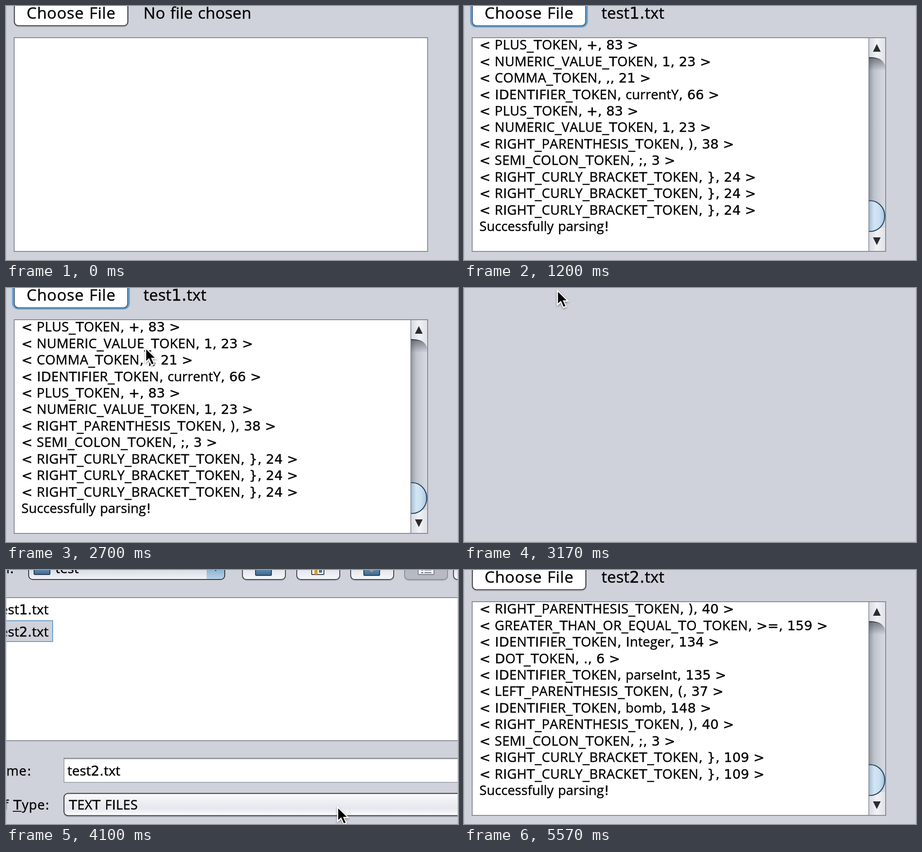
Animation, 998 px wide and 561 px high, one loop 5.6 s. Source, as an HTML page with a canvas:

```html
<!DOCTYPE html>
<html lang="en">
<head>
<meta charset="utf-8">
<title>Token parser</title>
<style>
html, body { margin: 0; width: 100%; height: 100%; overflow: hidden; background: #cfd2da; }
canvas { display: block; }
</style>
</head>
<body>
<canvas id="stage" width="998" height="561"></canvas>
<script>
const W = 998, H = 561, LOOP = 5600;
const ctx = document.getElementById('stage').getContext('2d');
const BG = '#cfd2da', LINE = '#858a96', DARK = '#34373e', BLUE = '#6a9ecd';

const RESULTS = {
  first: [
    '< PLUS_TOKEN, +, 83 >',
    '< NUMERIC_VALUE_TOKEN, 1, 23 >',
    '< COMMA_TOKEN, ,, 21 >',
    '< IDENTIFIER_TOKEN, currentY, 66 >',
    '< PLUS_TOKEN, +, 83 >',
    '< NUMERIC_VALUE_TOKEN, 1, 23 >',
    '< RIGHT_PARENTHESIS_TOKEN, ), 38 >',
    '< SEMI_COLON_TOKEN, ;, 3 >',
    '< RIGHT_CURLY_BRACKET_TOKEN, }, 24 >',
    '< RIGHT_CURLY_BRACKET_TOKEN, }, 24 >',
    '< RIGHT_CURLY_BRACKET_TOKEN, }, 24 >',
    'Successfully parsing!'
  ],
  second: [
    '< RIGHT_PARENTHESIS_TOKEN, ), 40 >',
    '< GREATER_THAN_OR_EQUAL_TO_TOKEN, >=, 159 >',
    '< IDENTIFIER_TOKEN, Integer, 134 >',
    '< DOT_TOKEN, ., 6 >',
    '< IDENTIFIER_TOKEN, parseInt, 135 >',
    '< LEFT_PARENTHESIS_TOKEN, (, 37 >',
    '< IDENTIFIER_TOKEN, bomb, 148 >',
    '< RIGHT_PARENTHESIS_TOKEN, ), 40 >',
    '< SEMI_COLON_TOKEN, ;, 3 >',
    '< RIGHT_CURLY_BRACKET_TOKEN, }, 109 >',
    '< RIGHT_CURLY_BRACKET_TOKEN, }, 109 >',
    'Successfully parsing!'
  ]
};

// Pointer paths as [time, x, y]
const PATHS = [
  [[2470, 705, 500], [2700, 307, 130], [2840, 222, 14], [3000, 207, 3], [3170, 205, 3],
   [3270, 200, 28], [3540, 171, 139], [3680, 85, 136], [3760, 85, 136],
   [3900, 330, 270], [4100, 731, 521], [4200, 860, 566]],
  [[4740, 560, 545], [4880, 300, 528], [5010, 134, 540], [5040, 130, 551], [5090, 130, 563]]
];

const within = (t, ...spans) => spans.some(([a, b]) => t >= a && t < b);

function box(x, y, w, h, fill) {
  ctx.fillStyle = fill;
  ctx.fillRect(x, y, w, h);
}

function rounded(x, y, w, h, r, fill, stroke, width = 2) {
  ctx.beginPath();
  ctx.roundRect(x, y, w, h, r);
  if (fill) { ctx.fillStyle = fill; ctx.fill(); }
  if (stroke) { ctx.strokeStyle = stroke; ctx.lineWidth = width; ctx.stroke(); }
}

function poly(points, fill) {
  ctx.beginPath();
  points.forEach(([x, y]) => ctx.lineTo(x, y));
  ctx.closePath();
  ctx.fillStyle = fill;
  ctx.fill();
}

function gradient(x0, y0, x1, y1, ...colors) {
  const g = ctx.createLinearGradient(x0, y0, x1, y1);
  colors.forEach((c, i) => g.addColorStop(i / (colors.length - 1), c));
  return g;
}

// Symbols and the wide capitals D, I, T use a second face; a hairline stroke adds weight.
function text(str, x, y, { size = 29.2, track, right = false } = {}) {
  ctx.fontKerning = 'none';
  const runs = str.match(/[A-CE-HJ-SU-Z]+|[a-z]+|[^A-CE-HJ-SU-Za-z]+/g).map(s => {
    const face = /[A-CE-HJ-SU-Za-z]/.test(s) ? 'Open Sans' : 'DejaVu Sans';
    const font = `${size}px "${face}", sans-serif`;
    const spacing = `${track ?? (/[A-Z]/.test(s) ? 0.3 : 0.05)}px`;
    ctx.font = font;
    ctx.letterSpacing = spacing;
    return { s, font, spacing, width: ctx.measureText(s).width };
  });
  if (right) x -= runs.reduce((sum, r) => sum + r.width, 0);
  ctx.fillStyle = ctx.strokeStyle = '#050505';
  ctx.lineWidth = 0.5;
  for (const r of runs) {
    ctx.font = r.font;
    ctx.letterSpacing = r.spacing;
    ctx.fillText(r.s, x, y);
    ctx.strokeText(r.s, x, y);
    x += r.width;
  }
}

function chooseButton(focused, pressed) {
  const fill = pressed ? gradient(0, 0, 0, 44, '#b9bdc7', '#d3d7df') : '#fff';
  if (focused) {
    rounded(16, -30, 255, 75, 11, null, BLUE, 5);
    rounded(18.5, -30, 250, 73.5, 9, fill, '#33506f', 1.7);
  } else {
    rounded(18, -30, 252, 76, 10, null, '#b4b8c1', 2);
    rounded(18.5, -30, 250.5, 73.5, 9, fill, DARK, 2);
  }
  text('Choose File', 45.6, 28, { size: 35, track: 0.7 });
}

function scrollbar() {
  box(893, 71, 37, 470, gradient(893, 0, 930, 0, '#8e929b', '#bfc3cc', '#cdd0d8', '#d6d9e0'));
  box(893, 113, 37, 30, gradient(0, 113, 0, 143, 'rgba(60,64,72,.6)', 'rgba(60,64,72,0)'));

  ctx.beginPath();
  ctx.moveTo(893, 71);
  ctx.lineTo(893, 113);
  ctx.bezierCurveTo(914, 113, 924, 117, 929, 132);
  ctx.lineTo(930, 132);
  ctx.lineTo(930, 71);
  ctx.closePath();
  ctx.fillStyle = gradient(893, 0, 930, 0, '#d5d8df', '#f1f2f5', '#dfe2e8');
  ctx.fill();
  ctx.beginPath();
  ctx.moveTo(893, 114);
  ctx.bezierCurveTo(914, 114, 924, 118, 929, 132);
  ctx.strokeStyle = gradient(893, 0, 930, 0, '#24262b', '#555a63', '#b8bcc5');
  ctx.lineWidth = 2;
  ctx.stroke();

  box(893, 490, 37, 51, gradient(893, 0, 930, 0, '#d5d8df', '#f1f2f5', '#dfe2e8'));
  ctx.save();
  ctx.beginPath();
  ctx.rect(894, 425, 38, 80);
  ctx.clip();
  ctx.beginPath();
  ctx.ellipse(897, 464, 32, 34, 0, 0, 7);
  ctx.fillStyle = gradient(894, 0, 929, 0, '#a0bdd6', '#d3e5f3', '#c9dff1', '#a4c3de');
  ctx.fill();
  ctx.strokeStyle = '#24445f';
  ctx.lineWidth = 2.2;
  ctx.stroke();
  ctx.restore();

  box(893, 71, 1.5, 470, '#80848e');
  poly([[911.5, 84], [920, 101], [903, 101]], '#2a2c30');
  poly([[903, 511], [920, 511], [911.5, 528]], '#2a2c30');
}

function mainWindow(t) {
  chooseButton(within(t, [330, 1000], [1200, 3040], [4770, 5310]), within(t, [2930, 3010]));
  const name = t < 30 ? 'No file chosen' : t < 4500 ? 'test1.txt' : 'test2.txt';
  text(name, 303.6, 28, { size: 35, track: 0.15 });

  box(17, 69, 915, 474, LINE);
  box(19, 71, 911, 470, '#fff');
  if (t < 1200) return;
  RESULTS[t < 5470 ? 'first' : 'second'].forEach((row, i) => text(row, 34, 96.2 + 36.45 * i));
  scrollbar();
}

function folder(x, bottom) {
  rounded(x, -20, 35, bottom + 20, 2, gradient(0, 0, 0, bottom, '#5f86a9', '#41688c'), '#263e55', 2);
}

function toolbar() {
  [521, 641, 760, 879, 987].forEach((x, i) => {
    const off = i === 3;
    rounded(x + 1, -30, 95, 53, 9, null, '#aeb2bb', 2);
    rounded(x + 1, -30, 95, 51, 9,
      off ? '#b7bac3' : gradient(0, 0, 0, 22, '#e3e6ec', '#f8f9fb'), off ? '#8d919a' : '#41454d');
  });
  folder(551, 12);
  rounded(675, -20, 27, 30, 1, '#f4f4f4', '#3a3d43', 2);
  box(681, 0, 7, 10, '#d99a2b');
  box(691, 0, 7, 6, '#4a7299');
  folder(790, 12);
  poly([[802, 0], [813, 0], [807, 5]], '#a99a86');
  rounded(910, -20, 35, 30, 1, '#f2f3f6', '#7b7f88', 2);
  for (const y of [-1, 5]) {
    box(917, y, 4, 2, '#555962');
    box(924, y, 15, 2, '#777b84');
  }
}

function dialog(t) {
  const picked = t >= 3740;
  text('In:', 18, 7, { right: true, size: 29.5 });

  if (!picked) rounded(47.5, -30, 438.5, 53.5, 11, null, BLUE, 5);
  rounded(50, -30, 433, 51, 9, gradient(0, 0, 0, 22, '#d9dde5', '#f3f5f8'));
  ctx.save();
  ctx.beginPath();
  ctx.roundRect(50, -30, 433, 51, 9);
  ctx.clip();
  box(443, 0, 42, 22, picked ? gradient(0, 0, 0, 22, '#8fb5d5', '#b9d4ea')
                             : gradient(0, 0, 0, 22, '#6d9cc4', '#9ac0e0'));
  ctx.restore();
  rounded(50, -30, 433, 51, 9, null, picked ? DARK : '#33506f', 2);
  poly([[459, -3], [467, -3], [463, 3]], '#2f4358');
  folder(62, 10);
  text('test', 109, 7, { size: 29.5 });
  toolbar();

  box(0, 60, W, 318, LINE);
  box(0, 62, W, 314, '#fff');
  if (picked) {
    box(0, 111, 104, 48, BLUE);
    box(0, 113, 102, 44, BG);
  } else {
    box(0, 62, 105, 48, BG);
  }
  text('test1.txt', 94, 98.2, { right: true, size: 29.7 });
  text('test2.txt', 94, 146.7, { right: true, size: 29.7 });

  text('Name:', 57, 454, { right: true, track: 1 });
  box(127, 415, W, 55, '#a4a8b1');
  box(127, 415, W, 2, '#7d818b');
  box(129, 417, W, 51, '#fff');
  box(129, 417, W, 3, gradient(0, 417, 0, 420, '#d5d7dc', '#fff'));
  text(picked ? 'test2.txt' : 'test1.txt', 135.5, 454, { size: 29.7 });

  text('of Type:', 97, 529, { right: true, track: 0.8 });
  box(15, 532, 19, 2, '#111');
  rounded(128, 495, 900, 50, 9, null, '#aeb2bb', 2);
  rounded(128, 493.5, 900, 49, 9,
    picked ? gradient(0, 493, 0, 543, '#fcfcfd', '#eef0f4', '#e5e8ee', '#fdfdfe')
           : gradient(0, 493, 0, 543, '#f3f4f7', '#dfe2e8', '#d5d9e1', '#f3f5f8'),
    picked ? DARK : '#50545d');
  text('TEXT FILES', 139, 529);
}

function pointer(t) {
  for (const path of PATHS) {
    const i = path.findIndex(p => p[0] > t);
    if (i < 1) continue;
    const [t0, x0, y0] = path[i - 1], [t1, x1, y1] = path[i];
    const k = (t - t0) / (t1 - t0);
    ctx.save();
    ctx.translate(x0 + (x1 - x0) * k, y0 + (y1 - y0) * k);
    ctx.shadowColor = 'rgba(0,0,0,.4)';
    ctx.shadowBlur = 4;
    ctx.shadowOffsetY = 2;
    poly([[0, 0], [0, 37], [8.5, 29.5], [14, 42], [22, 38.5], [16.5, 27], [27.5, 27]], '#fff');
    ctx.shadowColor = 'transparent';
    poly([[2.5, 5.5], [2.5, 31], [9, 25], [15, 38.5], [19, 36.8], [13, 24.3], [21.5, 24.3]], '#000');
    ctx.restore();
  }
}

function draw(t) {
  const dialogOpen = within(t, [3040, 4470]);
  box(0, 0, W, H, BG);
  if (!dialogOpen) mainWindow(t);
  else if (t >= 3270) dialog(t);
  box(0, 0, 1, H, '#b9bcc4');
  box(W - 1, 0, 1, H, '#b9bcc4');
  if (dialogOpen && t < 3270) box(0, H - 1, W, 1, '#b9bcc4');
  pointer(t);
}

let start;
function tick(now) {
  start ??= now;
  draw((now - start) % LOOP);
  requestAnimationFrame(tick);
}
requestAnimationFrame(tick);
</script>
</body>
</html>
```
